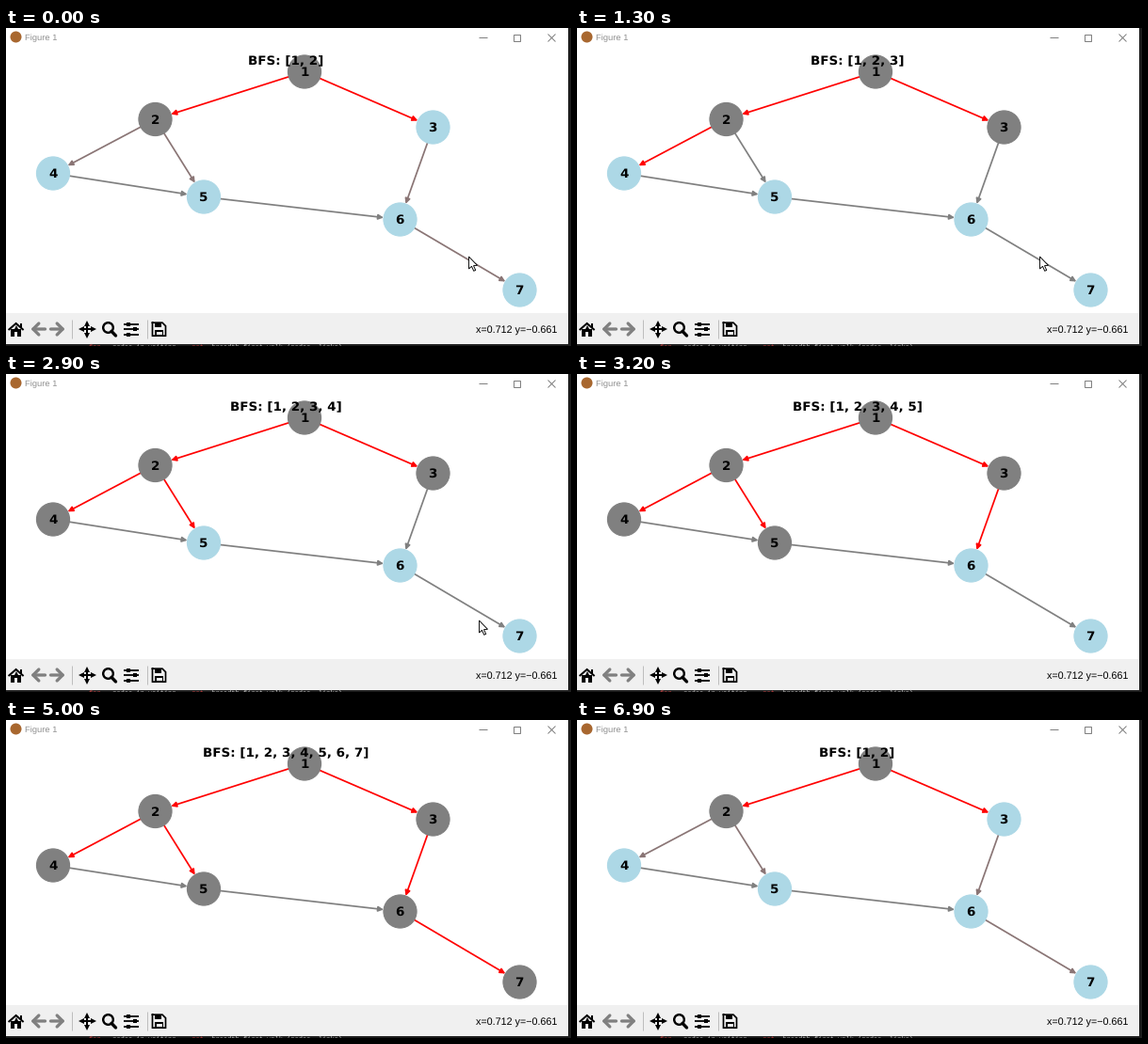
These frames come from a looping animation (600x338 px, 8000 ms). A matplotlib script:

```python
import matplotlib.pyplot as plt
from matplotlib.animation import FuncAnimation
from matplotlib.patches import FancyArrowPatch, Polygon, Rectangle

W, H, DPI = 600, 338, 80
PX = 72 / DPI  # points per pixel
STEP, LOOP = 100, 8000

NODES = {1: (317, 46.5), 2: (158.5, 97), 3: (453.5, 105.5), 4: (50, 154.5),
         5: (210, 179.5), 6: (418.5, 203.5), 7: (545.5, 278.5)}
PARENT = {2: 1, 3: 1, 4: 2, 5: 2, 6: 3, 7: 6}
CROSS = {4: 5, 5: 6}
NODE_SIZE = 1000
VISITED, FRESH, PANEL = "#808080", "#add8e6", "#f0f0f0"

# start in ms -> number of visited nodes
STEPS = {0: 2, 900: 3, 2100: 4, 3200: 5, 4600: 7, 5600: 1, 6900: 2}
LEAVE, GONE, RESTART = 2700, 3200, 5600

plt.rcParams["text.hinting"] = "none"
fig = plt.figure(figsize=(W / DPI, H / DPI), dpi=DPI, facecolor="white")
ax = fig.add_axes([0, 0, 1, 1])
ax.set_xlim(0, W)
ax.set_ylim(H, 0)
ax.axis("off")


def line(pts, color="black", width=2.0, cap="butt"):
    ax.plot(*zip(*pts), color=color, lw=width * PX, solid_capstyle=cap,
            solid_joinstyle="miter", zorder=6)


def mark(x, y, shape, size, fill="black", edge="none", width=0.0):
    ax.plot(x, y, shape, ms=size * PX, mfc=fill, mec=edge, mew=width * PX, zorder=6)


def rect(x0, y0, x1, y1, color="black", z=6):
    ax.add_patch(Rectangle((x0, y0), x1 - x0, y1 - y0, fc=color, ec="none", zorder=z))


def label(x, y, s, px, font="Liberation Sans", **kw):
    return ax.text(x, y, s, fontsize=px * PX, family=font, va="baseline", zorder=8, **kw)


def bold(x, y, s):
    return label(x, y, s, 13.45, "DejaVu Sans", weight="bold", ha="center")


def arrow(a, b, z=1, **kw):
    return ax.add_patch(FancyArrowPatch(a, b, zorder=z, **kw))


def link(a, b):
    gap = NODE_SIZE ** 0.5 / 2
    return arrow(NODES[a], NODES[b], arrowstyle="-|>", mutation_scale=10,
                 shrinkA=gap, shrinkB=gap, lw=1.55, color=VISITED)


def title_bar():
    mark(10, 9, "o", 12, "#a8672f")
    label(20, 13.6, "Figure 1", 9.4, color="#909090")
    line([(502, 9.8), (510.5, 9.8)], VISITED, 1)
    mark(542, 9.5, "s", 7, "none", VISITED, 1)
    mark(579, 9.7, "x", 8.5, "none", VISITED, 1)


def home_icon(cx=10.6):
    line([(cx - 8, 321), (cx, 314), (cx + 8, 321)])
    rect(cx - 5.5, 320, cx + 5.5, 327.5)
    rect(cx - 1.8, 323, cx + 1.8, 327.5, PANEL, 7)
    mark(cx, 319, "^", 6)
    rect(cx + 4, 313.5, cx + 6, 318)


def move_icon(cx=86, cy=320, r=9):
    line([(cx - r + 2, cy), (cx + r - 2, cy)])
    line([(cx, cy - r + 2), (cx, cy + r - 2)])
    for s, side, end in ((-1, "<", "^"), (1, ">", "v")):
        mark(cx + s * (r - 2.5), cy, side, 5.5)
        mark(cx, cy + s * (r - 2.5), end, 5.5)


def slider_icon():
    for k in range(3):
        y = 314.5 + 5.5 * k
        line([(125, y), (141, y)], width=1.8)
        mark(136.5 if k == 1 else 130, y, "s", 4.2)


def save_icon(cx=162.5, cy=320.2, r=7):
    line([(cx - r, cy - r), (cx + r / 2, cy - r), (cx + r, cy - r / 2),
          (cx + r, cy + r), (cx - r, cy + r), (cx - r, cy - r)], width=1.7,
         cap="projecting")
    rect(cx - 4.5, cy - r, cx + 2.5, cy - 2)
    rect(cx - 4.5, cy + 1, cx + 4.5, cy + r)
    rect(cx - 3, cy + 2.5, cx + 3, cy + r - 1, PANEL, 7)


def toolbar():
    rect(0, 302.5, W, 336.4, PANEL, 5)
    home_icon()
    for tail, tip in ((41.5, 26.5), (47.5, 62.5)):
        arrow((tail, 320), (tip, 320), 6, mutation_scale=PX, lw=3.3 * PX, shrinkA=0,
              shrinkB=0, arrowstyle="->,head_length=6,head_width=6", color=VISITED)
    move_icon()
    mark(108, 318.3, "o", 10.6, "none", "black", 2.4)
    line([(112, 322.3), (116.5, 327)], width=3.4, cap="round")
    slider_icon()
    save_icon()
    for x in (69.7, 149.7):
        line([(x, 310), (x, 330)], "#bdbdbd", 1)
    label(585.5, 324, "x=0.712 y=\u22120.661", 10.7, ha="right")


def desktop_edge():
    rect(0, 336.4, W, H, "#1e1e1e", 5)
    rect(597.4, 0, W, H, "#1e1e1e", 7)
    code = " " * 6 + "nodes_in_waiting" + " " * 9 + "breadth_first_walk (nodes, links)"
    words = "for" + " " * 23 + "not"
    for s, c in ((code, "#c8c8c8"), (words, "#d04545")):
        label(88, 340.8, s, 7, "Liberation Mono", color=c)


title_bar()
toolbar()
desktop_edge()

for a, b in CROSS.items():
    link(a, b)
edges = [link(a, b) for b, a in PARENT.items()]
dots = ax.scatter(*zip(*NODES.values()), s=NODE_SIZE, c=[FRESH] * len(NODES), zorder=2)
for n, (x, y) in NODES.items():
    bold(x - 0.3, y + 4.7, str(n))
title = bold(297.5, 39, "")

POINTER = [(0, 0), (0, 13), (3, 10.3), (5.2, 15.3), (7.2, 14.4), (5, 9.6), (9, 9.3)]
pointer = ax.add_patch(Polygon(POINTER, fc="white", ec="black", lw=0.9 * PX, zorder=9))


def pointer_pos(t):
    u = max(0, (t - LEAVE) / (GONE - 100 - LEAVE)) ** 2
    nudge = 3.5 if t >= 2500 else 0
    return 491.5 + 44 * u, 243 + nudge + 62 * u


def idle_color(t):
    """Grey that keeps a little red after the restart."""
    age = (t - RESTART) % LOOP
    warm = 0.18 if age < 1300 else 0.08 if age < 2600 else 0
    return 0.5 + warm / 2, 0.5 - warm / 2, 0.5 - warm / 2


def draw(i):
    t = i * STEP
    count = [n for start, n in STEPS.items() if start <= t][-1]
    title.set_text(f"BFS: {list(range(1, count + 1))}")
    dots.set_facecolor([VISITED if n <= count else FRESH for n in NODES])
    for k, edge in enumerate(edges):
        edge.set_color("red" if k < count else idle_color(t))

    pointer.set_visible(t < GONE)
    px, py = pointer_pos(t)
    pointer.set_xy([(px + x, py + y) for x, y in POINTER])
    return [title, dots, pointer, *edges]


anim = FuncAnimation(fig, draw, frames=LOOP // STEP, interval=STEP, repeat=True,
                     repeat_delay=0, blit=False)
plt.show()
```
